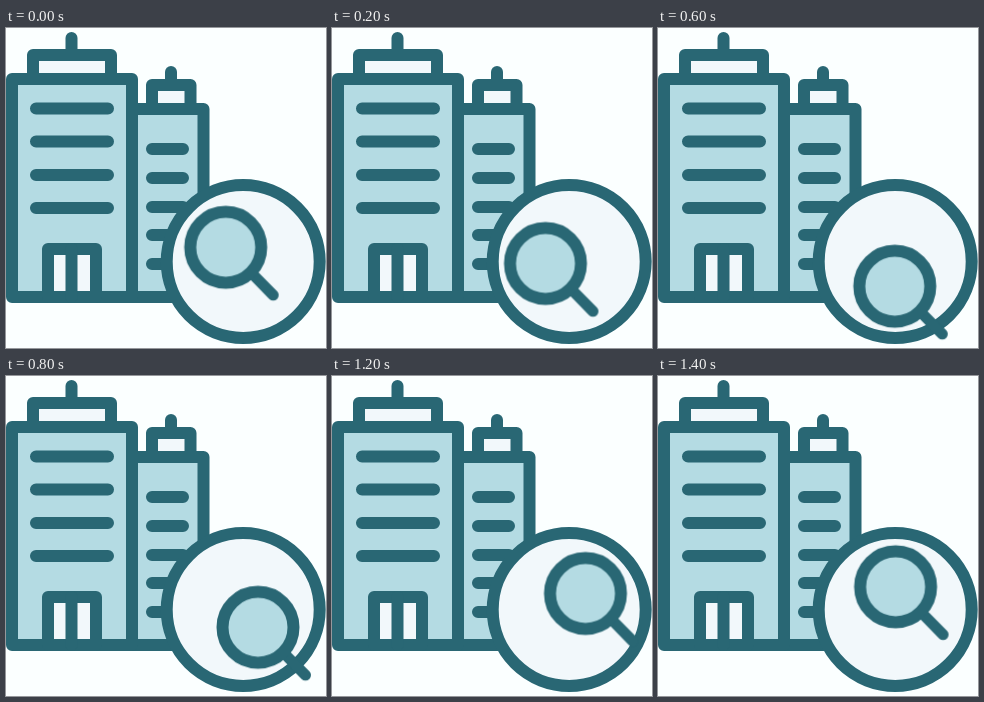
Recreate the animation shown at these times as an HTML page. Size 320 by 320 pixels, loop 1600 ms.

```html
<!DOCTYPE html>
<html lang="en">
<head>
<meta charset="utf-8">
<title>Building search</title>
<style>
  html, body { margin: 0; width: 100%; height: 100%; overflow: hidden; background: #fbffff; }
  svg {
    display: block; width: 100%; height: 100%;
    fill: none; stroke: #296774; stroke-width: 12;
    stroke-linecap: round; stroke-linejoin: round;
  }
  .wall { fill: #b4dbe3; }
  .pale { fill: #f2f8fb; }

  /* the glass circles inside the ring in eight hard steps */
  .glass { animation: orbit 1600ms step-end infinite; }
  @keyframes orbit {
    0%    { transform: translate(219.7px, 219.3px); }
    12.5% { transform: translate(213.5px, 235.5px); }
    25%   { transform: translate(221.6px, 250.3px); }
    37.5% { transform: translate(236.8px, 258.2px); }
    50%   { transform: translate(252px, 251.3px); }
    62.5% { transform: translate(260.6px, 233.2px); }
    75%   { transform: translate(253.5px, 217.5px); }
    87.5% { transform: translate(237.6px, 210.8px); }
  }
</style>
</head>
<body>
<svg viewBox="0 0 320 320">
  <!-- low building -->
  <path d="M165 44V57"/>
  <path class="pale" d="M146 81V57H184.5V81"/>
  <path class="wall" d="M126 81H197.5V269H126Z"/>
  <path d="M146 121H177M146 150H177M146 179H177M146 207H177M146 236H177"/>

  <!-- tall building -->
  <path d="M65.5 10V27"/>
  <path class="pale" d="M27 51V27H105V51"/>
  <path class="wall" d="M6 51H126V269H6Z"/>
  <path d="M30 80.5H102M30 113.5H102M30 147H102M30 180H102"/>
  <path class="pale" d="M42 269V221H90V269Z"/>
  <path d="M65.5 221V269"/>

  <!-- magnifier in its ring -->
  <circle class="pale" cx="237.2" cy="233.5" r="76.5"/>
  <g class="glass">
    <path d="M28 28L47.5 47.8" stroke-width="11"/>
    <circle class="wall" r="35.5"/>
  </g>
</svg>
</body>
</html>
```
